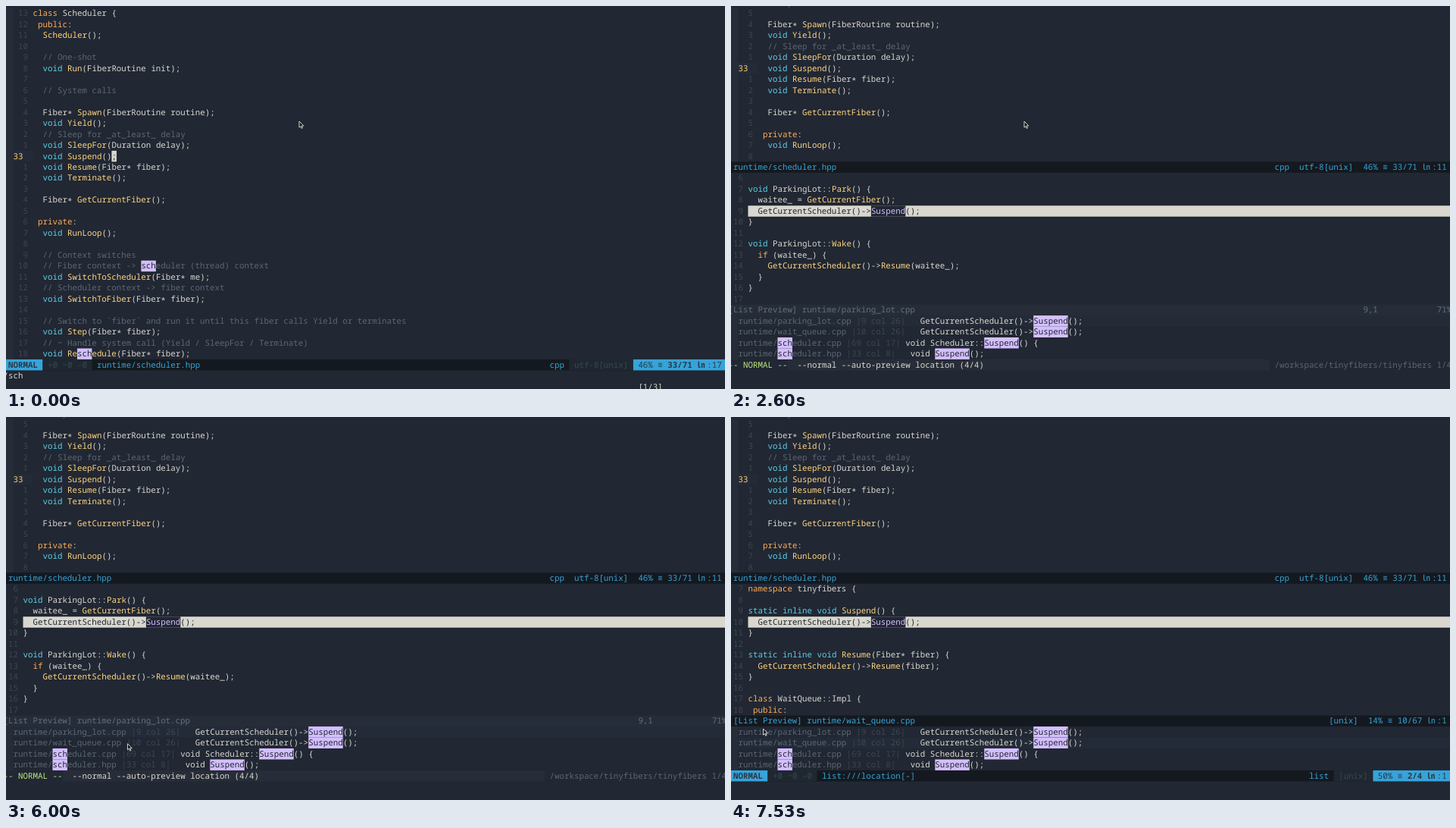
An HTML page for the animation above (8 s loop, 949 by 505 pixels).

```html
<!DOCTYPE html>
<html lang="en">
<head>
<meta charset="utf-8">
<title>Editor: jump to references</title>
<style>
html, body { margin: 0; width: 100%; height: 100%; overflow: hidden; background: #212733; }
svg { display: block; width: 949px; height: 505px; }
text {
  font: 10.825px "Noto Sans Mono", "DejaVu Sans Mono", "Noto Sans CJK SC", monospace;
  white-space: pre; text-rendering: geometricPrecision;
}
.bold { font-weight: 700; }
</style>
</head>
<body>
<svg viewBox="0 0 949 505" width="949" height="505">
  <rect width="949" height="505" fill="#212733"/>
  <g id="screen"></g>
  <path id="mouse" d="M0 0V8.2L1.9 6.5L3.2 9.4L4.5 8.8L3.2 6H5.8Z" fill="#14191f" stroke="#e8e8e4" stroke-width=".9"/>
</svg>
<script>
const LOOP = 8000;
const CW = 6.495, RH = 14.48, X0 = -3.47, Y0 = 2.6;
const BASELINE = 10.68, STAR_DROP = 2;
const C = {
  bg: '#212733', fg: '#d9d7ce', comment: '#5c6773', guide: '#3d4751', keyword: '#ffae57',
  func: '#ffd57f', type: '#5ccfe6', match: '#d4bfff', accent: '#ffcc66', panel: '#272d38',
  line: '#242b38', blue: '#36a3d9', bar: '#14191f', chip: '#1f2831', faint: '#3a4552',
  ink: '#2b3846', green: '#bbe67e'
};

const header = `class Scheduler {
 public:
  Scheduler();

  // One-shot
  void Run(FiberRoutine init);

  // System calls

  Fiber* Spawn(FiberRoutine routine);
  void Yield();
  // Sleep for _at_least_ delay
  void SleepFor(Duration delay);
  void Suspend();
  void Resume(Fiber* fiber);
  void Terminate();

  Fiber* GetCurrentFiber();

 private:
  void RunLoop();

  // Context switches
  // Fiber context -> scheduler (thread) context
  void SwitchToScheduler(Fiber* me);
  // Scheduler context -> fiber context
  void SwitchToFiber(Fiber* fiber);

  // Switch to \`fiber\` and run it until this fiber calls Yield or terminates
  void Step(Fiber* fiber);
  // ~ Handle system call (Yield / SleepFor / Terminate)
  void Reschedule(Fiber* fiber);`.split('\n');

const parkingLot = `
void ParkingLot::Park() {
  waitee_ = GetCurrentFiber();
  GetCurrentScheduler()->Suspend();
}

void ParkingLot::Wake() {
  if (waitee_) {
    GetCurrentScheduler()->Resume(waitee_);
  }
}
`.split('\n');

const waitQueue = `namespace tinyfibers {

static inline void Suspend() {
  GetCurrentScheduler()->Suspend();
}

static inline void Resume(Fiber* fiber) {
  GetCurrentScheduler()->Resume(fiber);
}

class WaitQueue::Impl {
 public:`.split('\n');

let out = '';
const esc = s => s.replace(/&/g, '&amp;').replace(/</g, '&lt;').replace(/>/g, '&gt;');
const colX = c => X0 + c * CW;
const rowY = r => Y0 + r * RH;

function fill(row, from, to, color) {
  out += `<rect x="${colX(from)}" y="${rowY(row)}" width="${(to - from) * CW}" height="${RH}" fill="${color}"/>`;
}

function put(row, col, str, color = C.fg, back, bold) {
  if (back) fill(row, col, col + str.length, back);
  const y = rowY(row) + BASELINE + (str === '*' ? STAR_DROP : 0);
  out += `<text x="${colX(col)}" y="${y}" fill="${color}"${bold ? ' class="bold"' : ''}>${esc(str)}</text>`;
}

const mark = (row, col, str) => put(row, col, str, C.bg, C.match);

function code(row, col, src) {
  const tokens = /\/\/.*|\w+|[^\s\w]+/g;
  for (const m of src.matchAll(tokens)) {
    const word = m[0];
    let color = C.fg;
    if (word.startsWith('//')) color = C.comment;
    else if (/^(class|public|private|if|namespace)$/.test(word)) color = C.keyword;
    else if (/^(void|static|inline)$/.test(word)) color = C.type;
    else if (/^\w/.test(word) && src[m.index + word.length] === '(') color = C.func;
    put(row, col + m.index, word, color);
  }
}

// Header file with line numbers relative to line 33
function headerPane(first, from, to) {
  const current = 13;
  for (let r = from; r <= to; r++) {
    const i = first + r;
    fill(r, 0, 2, C.panel);
    if (i === current) {
      fill(r, 2, 6, C.line);
      put(r, 2, '33', C.accent);
    } else {
      put(r, 3, String(Math.abs(i - current)).padStart(2), C.guide);
    }
    code(r, 6, header[i]);
  }
}

function position(row, col, percent, lines, column, color, strong) {
  put(row, col, percent, color);
  put(row, col + 4, '≡', color);
  put(row, col + 6, lines, color, null, strong);
  const end = col + 7 + lines.length;
  put(row, end, '㏑', color, null, strong);
  put(row, end + 2, ':' + column, color);
}

function activeBar(file, kind, kindCol, enc, encCol, pos) {
  const row = 32, edge = encCol + enc.length + 1;
  fill(row, 0, 147, C.bar);
  fill(row, 0, 8, C.blue);
  put(row, 1, 'NORMAL', C.ink, null, true);
  fill(row, 8, 18, C.chip);
  put(row, 9, '+0 ~0 -0', C.faint);
  put(row, 19, file, C.blue);
  put(row, kindCol, kind, C.blue);
  fill(row, encCol - 1, edge, C.chip);
  put(row, encCol, enc, C.faint);
  fill(row, edge, 147, C.blue);
  position(row, edge + 1, ...pos, C.ink, true);
}

function editor(step) {
  headerPane(0, 0, 31);
  mark(23, 28, 'sch');
  mark(31, 15, 'sch');
  const [col, char, back] = [[22, ';', C.fg], [20, '(', C.fg], [16, 'p', C.func]][Math.min(step, 2)];
  put(13, col, char, C.bg, back);
  activeBar('runtime/scheduler.hpp', 'cpp', 111, 'utf-8[unix]', 116, ['46%', '33/71', col - 5]);
  put(33, 0, '/sch');
  put(34, 129, '[1/3]');
  if (step === 3) put(34, 136, 'g');
}

function preview(lines, start) {
  lines.forEach((src, i) => {
    const row = 15 + i;
    put(row, 1, String(start + i).padStart(2), C.guide);
    if (row !== 18) return code(row, 4, src);
    fill(row, 4, 147, C.fg);
    put(row, 6, 'GetCurrentScheduler()->', C.bg);
    put(row, 29, 'Suspend', C.match, C.bg);
    put(row, 36, '();', C.bg);
  });
}

function listPane(selected) {
  const rows = [
    ['parking_lot.cpp', '|9 col 26|', 39, 'GetCurrentScheduler()->', '();'],
    ['wait_queue.cpp', '|10 col 26|', 39, 'GetCurrentScheduler()->', '();'],
    ['scheduler.cpp', '|69 col 17|', 36, 'void Scheduler::', '() {'],
    ['scheduler.hpp', '|33 col 8|', 37, 'void ', '();']
  ];
  rows.forEach(([file, place, col, before, after], i) => {
    const row = 28 + i;
    fill(row, 0, 2, C.panel);
    if (i === selected) fill(row, 2, 147, C.line);
    put(row, 2, 'runtime/' + file, C.comment);
    put(row, 11 + file.length, place, C.guide);
    put(row, col, before);
    const at = col + before.length;
    mark(row, at, 'Suspend');
    put(row, at + 7, after);
    if (file.startsWith('sch')) mark(row, 10, 'sch');
  });
}

function references(step) {
  const next = step === 6;
  put(-1, 4, '6', C.guide);
  code(-1, 6, header[7]);
  headerPane(8, 0, 13);
  fill(14, 0, 147, C.bar);
  put(14, 1, 'runtime/scheduler.hpp', C.blue);
  put(14, 111, 'cpp', C.blue);
  put(14, 116, 'utf-8[unix]', C.blue);
  position(14, 129, '46%', '33/71', 11, C.blue);
  preview(next ? waitQueue : parkingLot, next ? 7 : 6);
  listPane(next ? 1 : 0);

  if (next) {
    fill(27, 0, 147, C.bar);
    put(27, 1, '[List Preview] runtime/wait_queue.cpp', C.blue);
    put(27, 122, '[unix]', C.blue);
    position(27, 130, '14%', '10/67', 1, C.blue);
    activeBar('list:///location[-]', 'list', 118, '[unix]', 124, ['50%', '2/4', 1]);
    return;
  }
  fill(27, 0, 147, C.panel);
  put(27, 0, '[List Preview] runtime/parking_lot.cpp', '#607080');
  put(27, 129, '9,1', '#607080');
  put(27, 144, '71%', '#607080');
  fill(32, 12, 110, C.panel);
  put(32, 0, '-- NORMAL --', C.green);
  put(32, 14, '--normal --auto-preview location (4/4)');
  put(32, 111, '/workspace/tinyfibers/tinyfibers 1/4', C.comment);
  if (step === 5) {
    put(28, 2, 'r', C.bg, C.comment);
    put(34, 136, 'j');
  }
}

// Time, x, y of the pointer tip
const path = [
  [4400, 387, 152], [4500, 350, 165], [4600, 240, 215], [4700, 130, 275], [4800, 60, 317],
  [4870, 33.5, 335], [4950, 18, 362], [5050, 9, 398], [5100, 8, 406], [5470, 8, 406],
  [5560, 5, 430], [5650, 22, 465], [5750, 70, 471], [5870, 130, 458], [6000, 160.5, 431],
  [6100, 157, 400], [6200, 138, 372], [6270, 127, 367], [6300, 127, 367],
  [6400, 95, 378], [6500, 55, 403], [6570, 42.5, 411]
];

function pointer(t) {
  const i = path.findIndex(p => p[0] > t);
  if (i === 0) return path[0].slice(1);
  if (i < 0) return path[path.length - 1].slice(1);
  const a = path[i - 1], b = path[i], k = (t - a[0]) / (b[0] - a[0]);
  return [a[1] + (b[1] - a[1]) * k, a[2] + (b[2] - a[2]) * k];
}

const steps = [0, 770, 1270, 1800, 2530, 7400, 7500];
const screenEl = document.getElementById('screen');
const mouseEl = document.getElementById('mouse');
let shown = -1;

function render(t) {
  const step = steps.filter(s => s <= t).length - 1;
  if (step !== shown) {
    out = '';
    step < 4 ? editor(step) : references(step);
    screenEl.innerHTML = out;
    shown = step;
  }
  mouseEl.setAttribute('transform', `translate(${pointer(t)})`);
}

const start = performance.now();
function tick() {
  render((performance.now() - start) % LOOP);
  requestAnimationFrame(tick);
}
tick();
</script>
</body>
</html>
```
